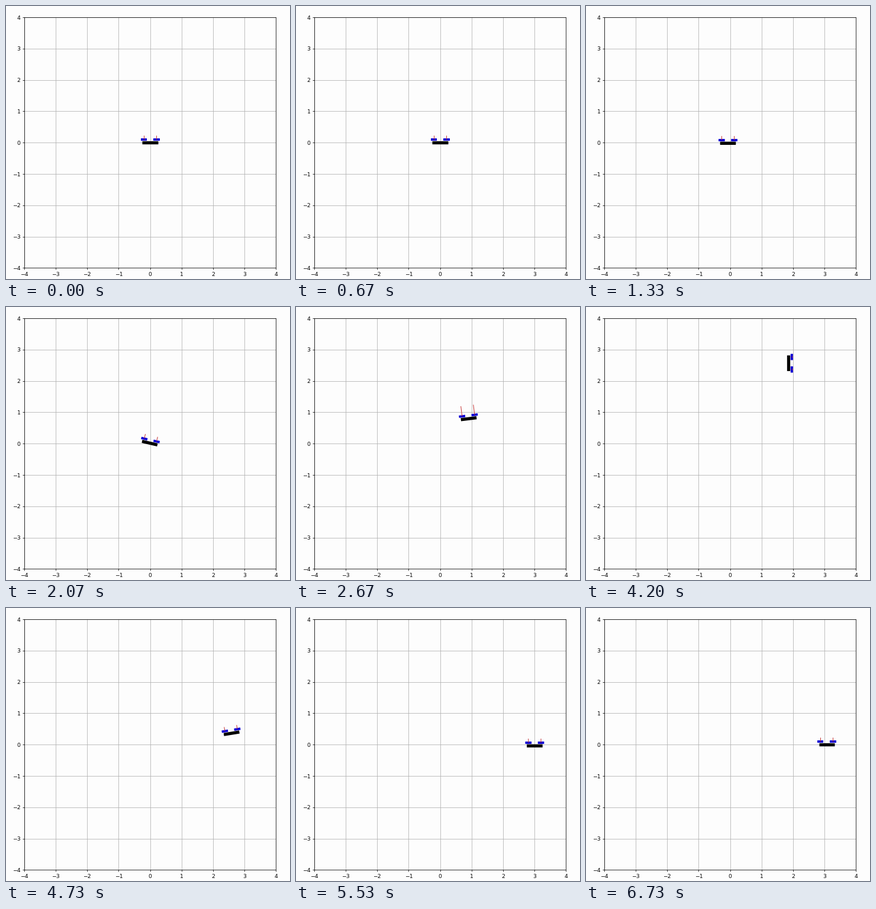
A matplotlib script for the animation above (6870 ms loop, 480 px wide and 460 px high).

```python
import numpy as np
import matplotlib.pyplot as plt
from matplotlib.animation import FuncAnimation

W, H, DPI = 480, 460, 72
TICK_MS, TICKS = 30, 229
SLOT_MS = TICK_MS * TICKS / 103
BG = "#fdfdfd"


def bump(t, center, width):
    return np.exp(-((t - center) / width) ** 2)


def rise(t, center, rate):
    return 1 / (1 + np.exp(-rate * (t - center)))


def pose(t):
    """Position, angle and thrust of the flip at simulation step t."""
    # Lean back, dash right, drift over the top, glide to the landing spot
    x = (1.15 * rise(t, 25.4, .78) + 1.92 * rise(t, 44.1, .28)
         - .10 * bump(t, 17, 5) + .11 * bump(t, 37, 4))
    # One hop, climbing slower than it falls
    s = t - 37.6
    y = (3.01 * np.exp(-abs(s / (9.64 if s < 0 else 8.12)) ** 3)
         - .02 * bump(t, 14, 4) - .05 * bump(t, 54, 4))
    # A steady full turn, with a lean before it and an overshoot after it
    turn = np.clip((t - 25.8) / 21.6, 0, 1)
    angle = 2 * np.pi * turn - .52 * bump(t, 24, 3.3) + .18 * bump(t, 49, 3)
    # Hover, boost, reverse while upside down, brake
    thrust = (.13 + .20 * bump(t, 27, 4) - .25 * bump(t, 37, 5)
              + .10 * bump(t, 45.5, 1.5))
    return x, y, angle, thrust


fig = plt.figure(figsize=(W / DPI, H / DPI), dpi=DPI, facecolor=BG)
left, right, top, bottom = 30.9, 456.4, 19.1, 441.4
ax = fig.add_axes([left / W, 1 - bottom / H, (right - left) / W, (bottom - top) / H],
                  facecolor=BG)
ax.set(xlim=(-4, 4), ylim=(-4, 4), xticks=range(-4, 5), yticks=range(-4, 5))
ax.tick_params(labelsize=9.2, length=3.2, pad=3.2)
ax.grid(True)


def bar(color, width, z):
    return ax.plot([], [], color=color, lw=width, solid_capstyle="butt", zorder=z)[0]


body = bar("black", 5.3, 3)
rotors = [bar("#0c00d4", 4, 4) for _ in range(2)]
thrusts = [bar("#c43434", 1, 5) for _ in range(2)]


def draw(tick):
    # The flight advances two steps every three display slots
    slot = int((tick + 1) * TICK_MS / SLOT_MS)
    x, y, angle, thrust = pose((2 * slot + 2) // 3)
    along = np.array([np.cos(angle), np.sin(angle)])
    up = np.array([-along[1], along[0]])
    center = np.array([x, y])

    def place(line, *ends):
        line.set_data(*zip(*(center + p * along + q * up for p, q in ends)))

    place(body, (-.25, 0), (.25, 0))
    for side, rotor, arrow in zip((-.2, .2), rotors, thrusts):
        place(rotor, (side - .1, .1), (side + .1, .1))
        place(arrow, (side, .1), (side, .1 + thrust))
    return [body, *rotors, *thrusts]


anim = FuncAnimation(fig, draw, frames=TICKS, interval=TICK_MS,
                     repeat=True, repeat_delay=0, blit=False)
plt.show()
```
